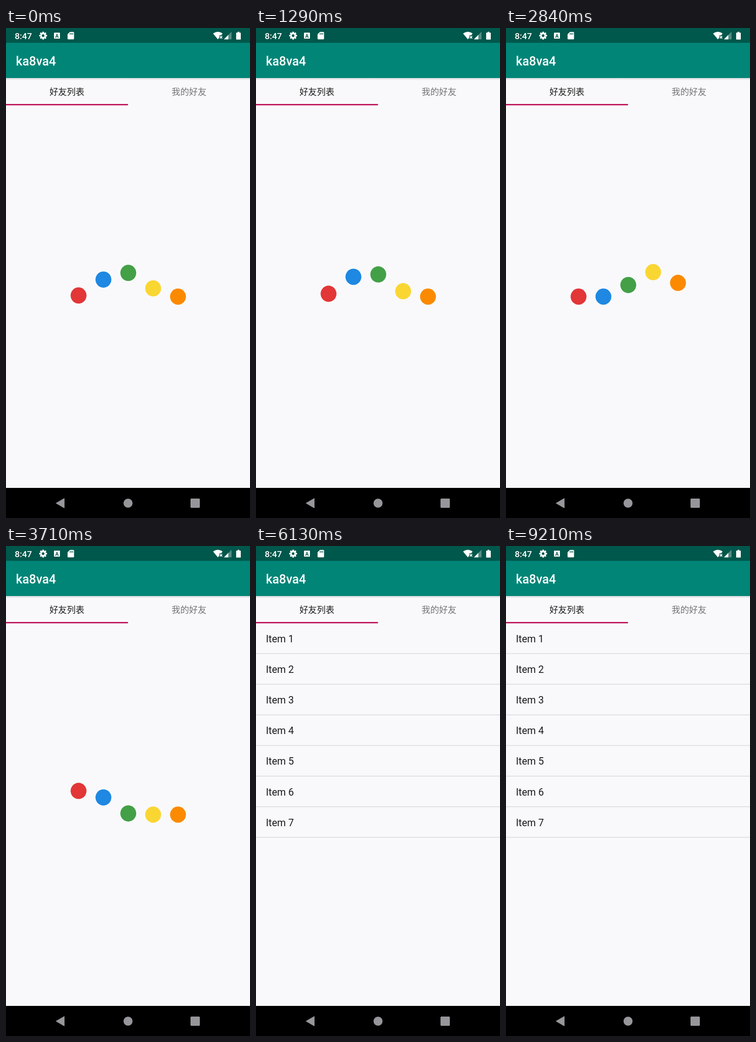
Write an HTML page that moves like this. It is 529x1058 px and loops after 9250 ms.

```html
<!DOCTYPE html>
<html lang="zh">
<head>
<meta charset="utf-8">
<title>Loading list</title>
<style>
  html, body { margin: 0; width: 100%; height: 100%; overflow: hidden; background: #f9f9fb; }
  svg { display: block; width: 100vw; height: 100vh; font-family: Roboto, "Noto Sans", sans-serif; }
  .tab { font: 400 18.9px "Noto Sans CJK SC", "Noto Sans CJK", sans-serif; text-anchor: middle; }
  .item { font-size: 21.55px; fill: #1b1b1d; }
</style>
</head>
<body>
<svg viewBox="0 0 529 1058" preserveAspectRatio="none">
  <defs>
    <linearGradient id="shade" x2="0" y2="1">
      <stop offset="0" stop-color="#000" stop-opacity=".13"/>
      <stop offset="1" stop-color="#000" stop-opacity="0"/>
    </linearGradient>
  </defs>
  <rect width="529" height="1058" fill="#f9f9fb"/>

  <g id="list" opacity="0"></g>
  <g id="dots"></g>

  <!-- app bar and tabs -->
  <rect y="32" width="529" height="76" fill="#008577"/>
  <rect y="108" width="529" height="5" fill="url(#shade)"/>
  <text x="21.5" y="81" font-size="26.9" font-weight="500" fill="#fff">ka8va4</text>
  <text class="tab" x="132" y="145" fill="#1c1c1c">好友列表</text>
  <text class="tab" x="396.8" y="145" fill="#747476">我的好友</text>
  <rect y="164" width="264.5" height="3" fill="#c01a5e"/>

  <!-- status bar -->
  <rect width="529" height="32" fill="#00574b"/>
  <g fill="#fff">
    <text x="19" y="23.5" font-size="18.9" font-weight="500">8:47</text>
    <g id="gear" transform="translate(80.5 16.5)">
      <circle r="4.7" fill="none" stroke="#fff" stroke-width="3.6"/>
    </g>
    <rect x="104" y="10" width="13" height="13" rx="1.2"/>
    <text x="110.5" y="20.5" font-size="11" font-weight="700" text-anchor="middle" fill="#00574b">A</text>
    <path d="M138.6 8.5H146a1.5 1.5 0 0 1 1.5 1.5V23a1.5 1.5 0 0 1-1.5 1.5H135A1.5 1.5 0 0 1 133.500 23V13.600Z"/>
    <path d="M139 11v3.200M141.800 11v3.200M144.600 11v3.200" stroke="#00574b" stroke-width="1.500"/>
    <path d="M449 12Q459.300 4.500 469.600 12L466.500 15.700H462.500V20.700L459.300 24.500Z"/>
    <path d="M463.700 17.300l5 5.400m0-5.400l-5 5.400" stroke="#fff" stroke-width="1.700"/>
    <path d="M489 8V24.500H472.500Z" opacity=".32"/>
    <path d="M482 15V24.500H472.500Z"/>
    <path d="M502 8.200h4v1.700h2a1 1 0 0 1 1 1V24a1 1 0 0 1-1 1h-8a1 1 0 0 1-1-1V10.900a1 1 0 0 1 1-1h2Z"/>
  </g>

  <!-- navigation bar -->
  <rect y="993" width="529" height="65" fill="#000"/>
  <g fill="#97969b">
    <path d="M108.500 1026L126.300 1015.700V1036.300Z" stroke="#97969b" stroke-linejoin="round"/>
    <circle cx="264.600" cy="1026" r="9.800"/>
    <rect x="400" y="1016" width="20.300" height="20" rx="2"/>
  </g>
</svg>
<script>
const LOOP = 9250;
const WAVE = { start: -604, period: 1317, lag: 159, half: 325, height: 53 };
const FADE = { start: 4246, length: 700 };
const REST_Y = 580;
const COLORS = ["#e23637", "#1e88e2", "#43a047", "#fad633", "#fb8a00"];

const byId = id => document.getElementById(id);
const dotsGroup = byId("dots"), list = byId("list");

function add(parent, tag, attrs, text) {
  const el = document.createElementNS("http://www.w3.org/2000/svg", tag);
  for (const key in attrs) el.setAttribute(key, attrs[key]);
  if (text) el.textContent = text;
  return parent.appendChild(el);
}

for (let i = 0; i < 8; i++) {
  add(byId("gear"), "rect", {
    x: -1.8, y: -8.5, width: 3.6, height: 3.5, rx: .5, transform: `rotate(${i * 45})`
  });
}

for (let i = 0; i < 7; i++) {
  const y = 166 + i * 66.1;
  add(list, "text", { class: "item", x: 21.5, y: y + 42 }, `Item ${i + 1}`);
  add(list, "rect", { x: 0, y: y + 65.7, width: 529, height: 1.4, fill: "#d7d7db" });
}

const dots = COLORS.map((fill, i) =>
  add(dotsGroup, "ellipse", { cx: 157.3 + i * 53.9, cy: REST_Y, rx: 17.2, ry: 17.5, fill }));

const ease = x => (1 - Math.cos(Math.PI * x)) / 2;

// One cosine hop per wave, then rest.
function hop(t, i) {
  const phase = (t - WAVE.start) % WAVE.period - i * WAVE.lag;
  const x = phase / WAVE.half;
  return x > 0 && x < 2 ? WAVE.height * ease(x) : 0;
}

function draw(t) {
  const shown = ease(Math.min(1, Math.max(0, (t - FADE.start) / FADE.length)));
  list.setAttribute("opacity", shown);
  dotsGroup.setAttribute("opacity", 1 - shown);
  dots.forEach((dot, i) => dot.setAttribute("cy", REST_Y - hop(t, i)));
}

const begin = performance.now();
function tick() {
  draw((performance.now() - begin) % LOOP);
  requestAnimationFrame(tick);
}
tick();
</script>
</body>
</html>
```
